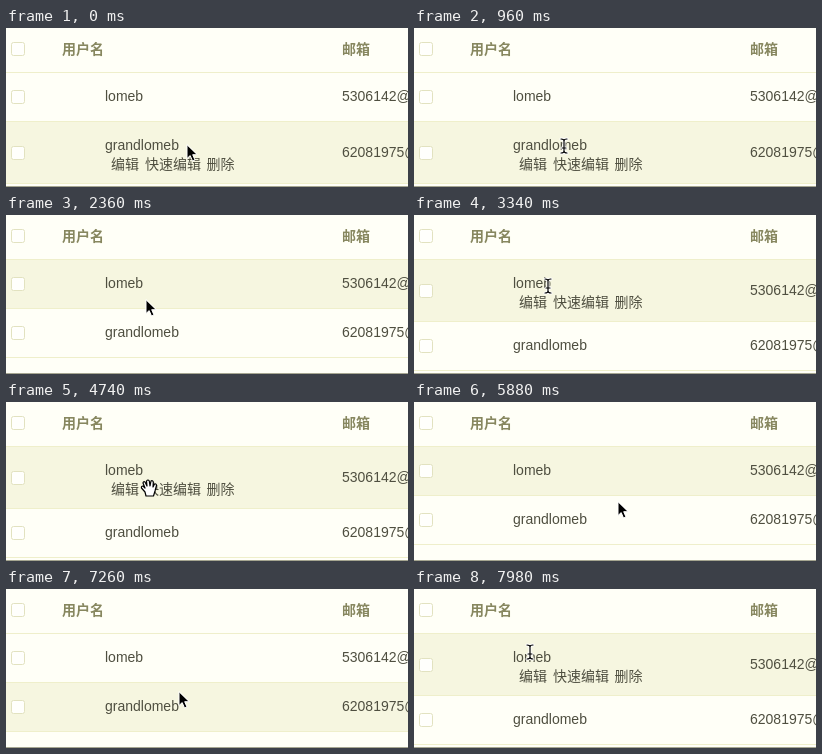
Animation, 402 px wide and 159 px high, one loop 8 s. Source, as an HTML page:

```html
<!DOCTYPE html>
<html lang="zh">
<head>
<meta charset="utf-8">
<style>
  html, body { margin: 0; width: 100%; height: 100%; overflow: hidden; background: #fffff7; }
  svg { display: block; }
  text { font: 14px "Liberation Sans", "Noto Sans CJK SC", "Noto Sans CJK", sans-serif; fill: #4f4f40; }
  .head { font-weight: 600; fill: #87875f; }
  .box { fill: #fffffc; stroke: #e2e2c0; }
  .line { stroke: #efefcb; }
  .cursor { stroke-linejoin: round; stroke-linecap: round; }
</style>
</head>
<body>
<svg width="402" height="159" viewBox="0 0 402 159">
  <rect class="box" x="5.5" y="14.5" width="13" height="13" rx="2"/>
  <text class="head" x="56" y="26">用户名</text>
  <text class="head" x="336" y="26">邮箱</text>
  <g id="rows"></g>
  <path class="line" d="M0 44.5H402"/>
  <path d="M0 158.5H402" stroke="#a6a691"/>
  <g class="cursor">
    <path id="arrow" d="M0 0V13.5L3.2 10.6L5.5 16L8 15L5.7 9.7H10Z" fill="#000" stroke="#fff"/>
    <path id="hand" fill="#fff" stroke="#000" stroke-width="1.2"
      d="M-3 8L-4 4L-7.5 0Q-8 -2 -6 -2L-4 0L-6 -5Q-5.5 -7 -4 -6L-2 -2L-2.5 -7Q-1 -9 .3 -7L1 -2L2 -7Q3.5 -8 4.3 -6L4 -1L5.5 -4Q7.5 -4.5 7.5 -2.5L6 3L4.5 8Z"/>
    <g id="ibeam" fill="none">
      <path d="M-3 -7Q0 -7 0 -5Q0 -7 3 -7M0 -5V5M-3 7Q0 7 0 5Q0 7 3 7M-2 2H2" stroke="#fff" stroke-width="3"/>
      <path d="M-3 -7Q0 -7 0 -5Q0 -7 3 -7M0 -5V5M-3 7Q0 7 0 5Q0 7 3 7M-2 2H2" stroke="#000" stroke-width="1.2"/>
    </g>
  </g>
</svg>
<script>
const LOOP = 8000, TOP = 45, ROW = 49, OPEN_ROW = 62, NAME_X = 99, HOVER_LAG = 60;
const users = [
  { name: "lomeb", mail: "5306142@" },
  { name: "grandlomeb", mail: "62081975@" }
];
// time, x, y of the pointer
const path = [
  [0, 181, 117], [420, 162, 136], [820, 150, 120], [1560, 150, 103], [1700, 150, 100],
  [1800, 150, 100], [2360, 140, 85], [2620, 134, 71], [4180, 134, 71], [4640, 143, 86],
  [4780, 143, 86], [5080, 170, 98], [5260, 178, 84], [5700, 198, 62], [5980, 207, 115],
  [6240, 208, 41], [6460, 210, 112], [6600, 211, 95], [6700, 211, 95], [6940, 200, 62],
  [7200, 175, 106], [7520, 150, 70], [7900, 116, 63], [LOOP, 116, 63]
];
const $ = id => document.getElementById(id);

$("rows").innerHTML = users.map(({ name, mail }) => `
  <g>
    <rect class="shade" width="402" fill="#f6f6e0"/>
    <g class="middle">
      <rect class="box" x="5.5" y="-6" width="13" height="13" rx="2"/>
      <text x="336" y="4.5">${mail}</text>
    </g>
    <text class="name" x="${NAME_X}" y="28">${name}</text>
    <g class="menu">
      <text x="105" y="47">编辑</text>
      <text x="139" y="47">快速编辑</text>
      <text x="200.5" y="47">删除</text>
    </g>
    <path class="line edge"/>
  </g>`).join("");
const rows = [...$("rows").children].map(group => ({
  group,
  part: name => group.querySelector("." + name)
}));

function show(element, visible) {
  element.setAttribute("visibility", visible ? "visible" : "hidden");
}

function pointerAt(t) {
  const i = path.findIndex(key => key[0] > t);
  const [t0, x0, y0] = path[i - 1], [t1, x1, y1] = path[i];
  const p = (t - t0) / (t1 - t0), e = p * p * (3 - 2 * p);
  return [x0 + (x1 - x0) * e, y0 + (y1 - y0) * e];
}

function openRowAt(t) {
  if (t < 1660) return 1;
  return t >= 2560 && t < 5300 || t >= 7620 ? 0 : -1;
}

function cursorKind(x, localY, row, isOpen) {
  const nameEnd = NAME_X + row.part("name").getComputedTextLength();
  if (isOpen && x > 105 && x < 230 && localY > 33 && localY < 52) return "hand";
  if (x > NAME_X && x < nameEnd && localY > 14 && localY < 32) return "ibeam";
  return "arrow";
}

function draw(t) {
  const [x, y] = pointerAt(t);
  const open = openRowAt(t);
  const secondTop = TOP + (open === 0 ? OPEN_ROW : ROW);
  const rowAt = pointerY => pointerY >= secondTop ? 1 : 0;

  // the highlight follows slightly behind the pointer
  const active = open >= 0 ? open : rowAt(pointerAt(Math.max(0, t - HOVER_LAG))[1]);
  rows.forEach(({ group, part }, i) => {
    const height = i === open ? OPEN_ROW : ROW;
    group.setAttribute("transform", `translate(0 ${i ? secondTop : TOP})`);
    part("shade").setAttribute("height", height);
    part("middle").setAttribute("transform", `translate(0 ${Math.floor(height / 2) - .5})`);
    part("edge").setAttribute("d", `M0 ${height - .5}H402`);
    show(part("shade"), i === active);
    show(part("menu"), i === open);
  });

  const under = rowAt(y);
  const kind = cursorKind(x, y - (under ? secondTop : TOP), rows[under], under === open);
  for (const id of ["arrow", "hand", "ibeam"]) {
    show($(id), id === kind);
    $(id).setAttribute("transform", `translate(${Math.round(x)} ${Math.round(y)})`);
  }
}

function tick() {
  draw(performance.now() % LOOP);
  requestAnimationFrame(tick);
}
tick();
</script>
</body>
</html>
```
